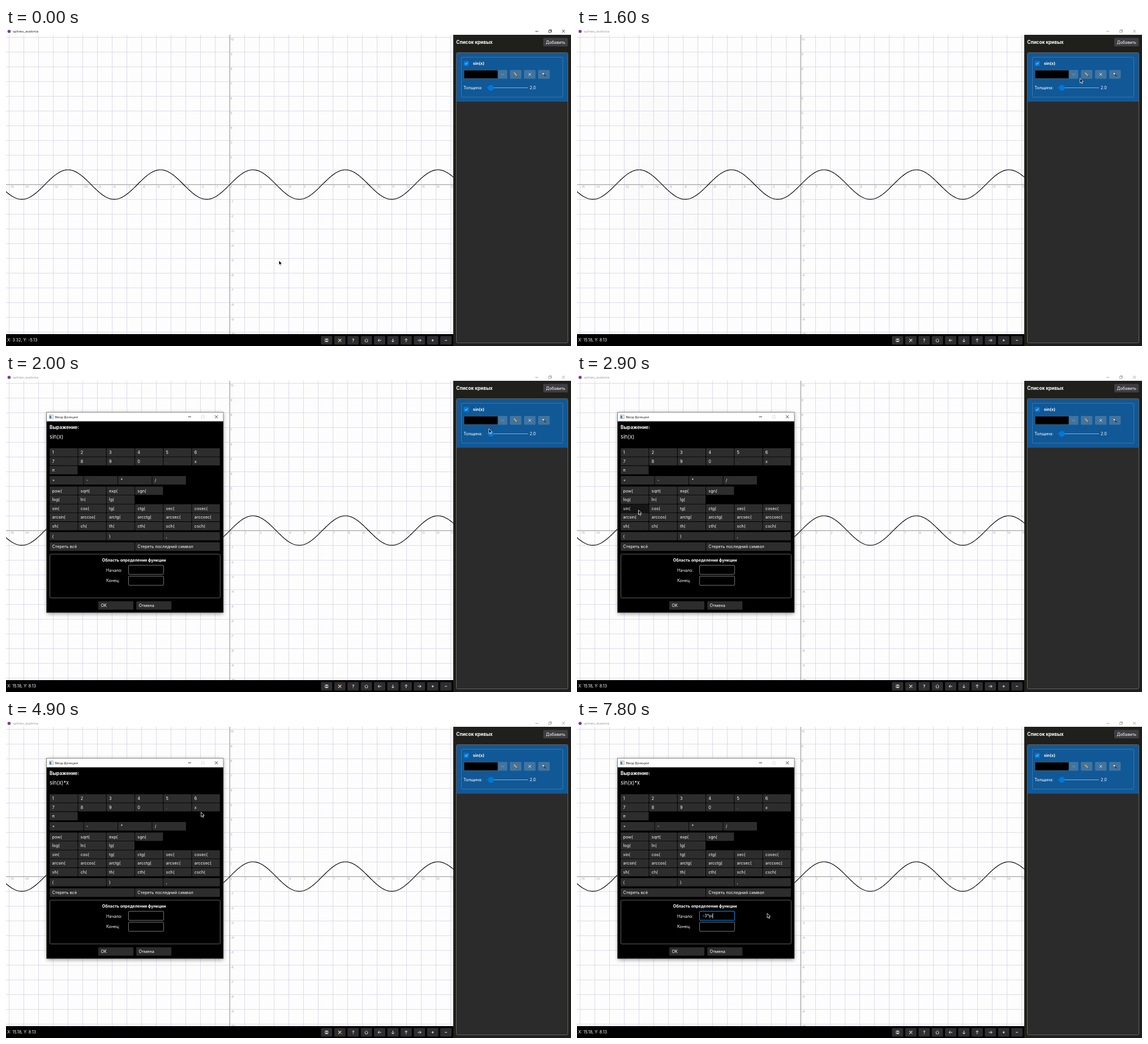
An HTML page with a canvas for the animation above (8 s loop, 998 by 561 pixels).

```html
<!DOCTYPE html>
<html lang="ru">
<head>
<meta charset="utf-8">
<title>splines_avalonia</title>
<style>
html, body { margin: 0; width: 100%; height: 100%; overflow: hidden; background: #000; }
canvas { display: block; width: 998px; height: 561px; }
</style>
</head>
<body>
<canvas id="stage" width="998" height="561"></canvas>
<script>
const LOOP = 8000, W = 998, H = 561;
const UNIT = 26, OX = 395, OY = 276;
const OPEN = 1600, FOCUS = 5300;
const UI = 'Inter, sans-serif', SYS = '"Open Sans", sans-serif';

const main = document.getElementById('stage').getContext('2d');
const layer = document.createElement('canvas');
layer.width = W * 2;
layer.height = H * 2;
const layerCtx = layer.getContext('2d');
layerCtx.scale(2, 2);
let c = main;

// Pointer stops: time, x, y
const PATH = [
  [0, 482, 410], [200, 482, 410], [800, 790.4, 65.2], [1050, 873.5, 72],
  [1150, 873.5, 72], [1350, 897, 82], [1450, 897, 82], [1650, 887, 90],
  [1900, 887, 90], [2700, 108.5, 240], [3000, 108.5, 240], [3700, 224, 187],
  [4150, 224, 187], [4650, 350, 154], [4850, 350, 154], [5250, 229.5, 345],
  [5400, 229.5, 345], [5600, 336, 341], [LOOP, 336, 341]
];

function pointerAt(t) {
  const i = Math.max(1, PATH.findIndex(p => p[0] > t));
  const [t0, x0, y0] = PATH[i - 1], [t1, x1, y1] = PATH[i];
  const p = (t - t0) / (t1 - t0), e = p * p * (3 - 2 * p);
  return { x: x0 + (x1 - x0) * e, y: y0 + (y1 - y0) * e };
}

const inside = (p, x, y, w, h) => p.x >= x && p.x < x + w && p.y >= y && p.y < y + h;

function box(x, y, w, h, fill, stroke, r = 0, lw = 0.8) {
  c.beginPath();
  c.roundRect(x, y, w, h, r);
  if (fill) { c.fillStyle = fill; c.fill(); }
  if (stroke) { c.strokeStyle = stroke; c.lineWidth = lw; c.stroke(); }
}

function line(points, color, lw = 0.8, fill) {
  c.beginPath();
  points.forEach(([x, y]) => c.lineTo(x, y));
  if (fill) { c.closePath(); c.fillStyle = fill; c.fill(); }
  c.strokeStyle = color;
  c.lineWidth = lw;
  c.stroke();
}

function dot(x, y, r, fill, stroke, lw = 0.8) {
  c.beginPath();
  c.arc(x, y, r, 0, Math.PI * 2);
  if (fill) { c.fillStyle = fill; c.fill(); }
  if (stroke) { c.strokeStyle = stroke; c.lineWidth = lw; c.stroke(); }
}

// y is the middle of the capitals
function text(s, x, y, { size = 7.28, color = '#fff', weight = 400, font = UI } = {}) {
  c.font = `${weight} ${size}px ${font}`;
  c.fillStyle = color;
  c.fillText(s, x, y + size * 0.364);
  return c.measureText(s).width;
}

function cross(x, y, r, color, lw = 0.8) {
  line([[x - r, y - r], [x + r, y + r]], color, lw);
  line([[x + r, y - r], [x - r, y + r]], color, lw);
}

function drawPlot() {
  c.save();
  c.beginPath();
  c.rect(0, 12, 790, 528);
  c.clip();
  box(0, 12, 790, 528, '#fdfdfd');
  for (let i = -15; i <= 15; i++) box(OX + i * UNIT, 12, 1, 528, '#dddbe9');
  for (let i = -10; i <= 10; i++) box(0, OY + i * UNIT, 790, 1, '#dddbe9');
  box(OX - 0.3, 12, 1.3, 528, '#a3a3a3');
  box(0, OY - 0.3, 790, 1.3, '#a3a3a3');
  const label = { size: 5.2, color: '#a0a0a0' };
  for (let i = -15; i <= 15; i++) text(String(i), OX + i * UNIT + 1.2, OY + 4.4, label);
  for (let i = -10; i <= 10; i++) if (i) text(String(i), OX + 1.6, OY - i * UNIT + 4.4, label);
  const curve = [];
  for (let x = -1; x <= 791; x++) curve.push([x, OY + 0.2 - UNIT * Math.sin((x - OX - 0.4) / UNIT)]);
  line(curve, '#000', 1.15);
  c.restore();
}

function drawTitle(active) {
  const ink = active ? '#111' : '#8f8f8f';
  box(0, 0, W, 12, '#fff');
  dot(5.5, 6, 2.8, '#7a3a94');
  text('splines_avalonia', 12, 6.1, { size: 5.95, color: ink, font: SYS });
  line([[935, 6], [940.3, 6]], ink, 0.8);
  box(958.6, 4.2, 3.8, 3.8, null, ink, 0, 0.7);
  line([[959.8, 4], [959.8, 3], [963.6, 3], [963.6, 6.8], [962.6, 6.8]], ink, 0.7);
  cross(984.7, 5.6, 2.5, ink, 0.8);
}

function arrow(x, y, angle) {
  c.save();
  c.translate(x, y);
  c.rotate(angle);
  line([[-3, 0], [3, 0]], '#fff', 0.85);
  line([[0.5, -2.5], [3, 0], [0.5, 2.5]], '#fff', 0.85);
  c.restore();
}

const TOOLS = [
  (x, y) => {
    box(x - 2.6, y - 2.6, 5.2, 5.2, null, '#ddd', 0.5, 0.8);
    box(x - 1.4, y - 2.5, 2.8, 1.7, '#ddd');
    box(x - 1.5, y + 0.6, 3, 2, '#ddd');
  },
  (x, y) => {
    line([[x - 2.8, y + 2.8], [x + 2.5, y - 2.5]], '#d8d8d8', 1.2);
    line([[x - 2.6, y - 2.6], [x, y]], '#c9c9c9', 1.4);
    line([[x, y], [x + 2.7, y + 2.7]], '#d98a3a', 1.4);
  },
  (x, y) => text('?', x - 1.9, y, { weight: 600 }),
  (x, y) => line([[x - 3, y], [x, y - 3], [x + 3, y], [x + 2, y], [x + 2, y + 2.8],
    [x - 2, y + 2.8], [x - 2, y], [x - 3, y]], '#eee', 0.75),
  (x, y) => arrow(x, y, Math.PI),
  (x, y) => arrow(x, y, Math.PI / 2),
  (x, y) => arrow(x, y, -Math.PI / 2),
  (x, y) => arrow(x, y, 0),
  (x, y) => { line([[x - 2, y], [x + 2, y]], '#fff', 0.9); line([[x, y - 2], [x, y + 2]], '#fff', 0.9); },
  (x, y) => line([[x - 2, y], [x + 2, y]], '#fff', 0.9)
];

function drawStatus(p, t) {
  box(0, 540, 790, 21, '#000');
  const x = t < 800 ? (p.x - 395.7) / UNIT : 15.18;
  const y = t < 800 ? (276.6 - p.y) / UNIT : 8.13;
  text(`X: ${x.toFixed(2)}, Y: ${y.toFixed(2)}`, 2.2, 550.6);
  TOOLS.forEach((icon, i) => {
    const bx = 556.3 + i * 23.42;
    box(bx, 543.4, 20, 15, '#2e2e30', null, 1.5);
    icon(bx + 10, 551);
  });
}

function drawPanel(p, t) {
  const hover = t < OPEN && inside(p, 796, 44, 196, 86);
  box(790, 12, 208, 549, '#1f1f1b');
  text('Список кривых', 795.3, 25.2, { size: 8.25, weight: 700 });
  box(949, 17.5, 43.5, 15, '#3e3e42', null, 1.5);
  text('Добавить', 953.5, 25.2);
  box(795.5, 43.5, 197, 512, '#2b2b2b', '#77777a', 2);
  box(796, 44, 196, 86, hover ? '#0966b6' : '#115897');
  box(804.5, 51.5, 179, 70.5, null, hover ? '#3d86c2' : '#477eaf', 1.5);

  box(808.5, 58, 9, 9, '#0078d7', null, 1);
  line([[810.8, 62.6], [812.4, 64.2], [815.4, 60.8]], '#fff', 0.9);
  text('sin(x)', 824.8, 62.8, { weight: 700, size: 7.2 });

  const button = hover ? '#3b80bb' : '#41749f';
  box(808.5, 74, 77, 15.5, button, null, 1.5);
  box(809, 74.4, 59.8, 14.7, '#000', '#36536c', 1);
  if (!hover) line([[874.4, 80.4], [877.2, 83.2], [880, 80.4]], '#9cb6cc', 0.7);
  [890, 915, 940].forEach(x => box(x, 74, 20.4, 15.5, button, null, 1.5));
  line([[897.6, 79], [902.6, 84.4]], '#e9a63a', 1.9);
  line([[897.2, 78.6], [898, 79.4]], '#d77a86', 1.9);
  line([[902.5, 84.3], [903.5, 85.3]], '#2a2118', 1.2);
  cross(925.2, 81.8, 2.3, '#fff', 0.8);
  line([[950.5, 82.2], [953.5, 85.2]], '#2b2b2b', 1.5);
  dot(949, 80.6, 2.2, '#b9d4e6', '#38454f', 0.8);

  text('Толщина:', 808, 105.6);
  line([[848, 105.5], [857, 105.5]], '#0078d7', 1);
  line([[857, 105.5], [922, 105.5]], '#8fb1cd', 1);
  dot(856.5, 105.5, 5.2, '#0078d7');
  text('2.0', 925, 105.6);
}

// Rows of keys: middle, column width, labels
const KEYS = [
  [138.3, 50.25, '1 2 3 4 5 6'],
  [153.9, 50.25, '7 8 9 0 . x'],
  [169.6, 50.25, 'π'],
  [187.5, 60.4, '+ - * /'],
  [205.9, 50.25, 'pow( sqrt( exp( sgn('],
  [221.5, 50.25, 'log( ln( lg('],
  [237.1, 50.25, 'sin( cos( tg( ctg( sec( cosec('],
  [252.7, 50.25, 'arcsin( arccos( arctg( arcctg( arcsec( arccsec('],
  [268.3, 50.25, 'sh( ch( th( cth( sch( csch('],
  [286.2, 100.5, '( ) ,'],
  [304.5, 150.75, 'Стереть_всё Стереть_последний_символ']
];

function key(label, x, y, w, p) {
  const hover = inside(p, x, y - 7.4, w, 14.8);
  box(x, y - 7.4, w, 14.8, hover ? '#161616' : '#2d2d2e', null, 1);
  text(label, x + 4.4, y);
}

const typed = t => '-3*pi'.slice(0, [7000, 7100, 7300, 7600, 7800].filter(s => t >= s).length);

function caretOn(t) {
  const since = t >= 7000 ? 7000 : FOCUS;
  return t >= 7000 && t < 7800 || Math.floor((t - (t >= 7800 ? 7800 : since)) / 500) % 2 === 0;
}

function drawDialog(p, t) {
  c.save();
  c.shadowColor = 'rgba(0,0,0,0.4)';
  c.shadowBlur = 7;
  c.shadowOffsetY = 1.5;
  box(71.5, 67.5, 312.5, 353.5, '#000');
  c.restore();
  box(71.5, 67.5, 312.5, 353.5, '#000', '#6b6b6b', 0, 0.7);
  box(71.8, 67.8, 311.9, 15.7, '#fff');
  box(76.5, 72.2, 6.8, 6.6, '#e8eef4', '#7d8790', 0, 0.6);
  box(77.2, 73.7, 2.8, 4.4, '#3f78b5');
  text('Ввод функции', 86.2, 75.8, { size: 5.95, color: '#111', font: SYS });
  line([[321.5, 75.6], [327, 75.6]], '#111', 0.8);
  box(345.3, 73.2, 4.8, 4.8, null, '#d0d0d0', 0, 0.7);
  cross(371.6, 75.5, 2.6, '#111', 0.8);

  text('Выражение:', 77, 94.4, { size: 8.25, weight: 700 });
  text('sin(x)' + (t >= 3900 ? '*' : '') + (t >= 4800 ? 'x' : ''), 77, 110.4, { size: 9.25 });
  for (const [y, w, labels] of KEYS)
    labels.split(' ').forEach((s, i) => key(s.replace(/_/g, ' '), 77.2 + i * w, y, w - 0.9, p));

  box(77.5, 317.8, 300.8, 77.2, null, '#7b7b7b', 2);
  text('Область определения функции', 169.8, 328, { size: 7.08, weight: 700 });
  text('Начало:', 177, 346);
  text('Конец:', 177, 364.2);
  const focus = t >= FOCUS;
  box(216.4, 337.4, 62, 16, '#000', focus ? '#0b7bd8' : '#9a9a9a', 1.5, focus ? 1.2 : 0.8);
  box(216.4, 356.6, 62, 16.2, '#000', '#9a9a9a', 1.5);
  if (focus) {
    const w = text(typed(t), 221.8, 345.6);
    if (caretOn(t)) box(222 + w, 341, 0.8, 9, '#fff');
  }
  key('OK', 163, 408.4, 62, p);
  key('Отмена', 230.2, 408.4, 62, p);
}

function showDialog(p, t) {
  const k = Math.min(1, (t - OPEN) / 200);
  if (k === 1) return drawDialog(p, t);
  const e = 1 - Math.pow(1 - k, 1.85), s = 0.94 + 0.06 * e;
  layerCtx.clearRect(0, 0, W, H);
  c = layerCtx;
  drawDialog(p, t);
  c = main;
  c.save();
  c.globalAlpha = e;
  c.translate(227.7, 244.2);
  c.scale(s, s);
  c.drawImage(layer, -227.7, -244.2, W, H);
  c.restore();
}

function drawPointer({ x, y }, t) {
  c.save();
  c.translate(x, y);
  if (t > OPEN && inside({ x, y }, 216, 337, 62.5, 36)) {
    line([[-1.7, -4.3], [1.7, -4.3]], '#fff', 0.7);
    line([[0, -4.3], [0, 4.3]], '#fff', 0.7);
    line([[-1.7, 4.3], [1.7, 4.3]], '#fff', 0.7);
  } else {
    line([[0, 0], [0, 8.2], [1.9, 6.5], [3.1, 9.3], [4.4, 8.7], [3.2, 6], [5.7, 5.8], [0, 0]],
      '#fff', 0.8, '#000');
  }
  c.restore();
}

function draw(t) {
  const p = pointerAt(t);
  c.clearRect(0, 0, W, H);
  drawPlot();
  drawStatus(p, t);
  drawPanel(p, t);
  drawTitle(t < OPEN);
  if (t >= OPEN) showDialog(p, t);
  drawPointer(p, t);
}

const start = performance.now();
function frame() {
  draw((performance.now() - start) % LOOP);
  requestAnimationFrame(frame);
}
frame();
</script>
</body>
</html>
```
